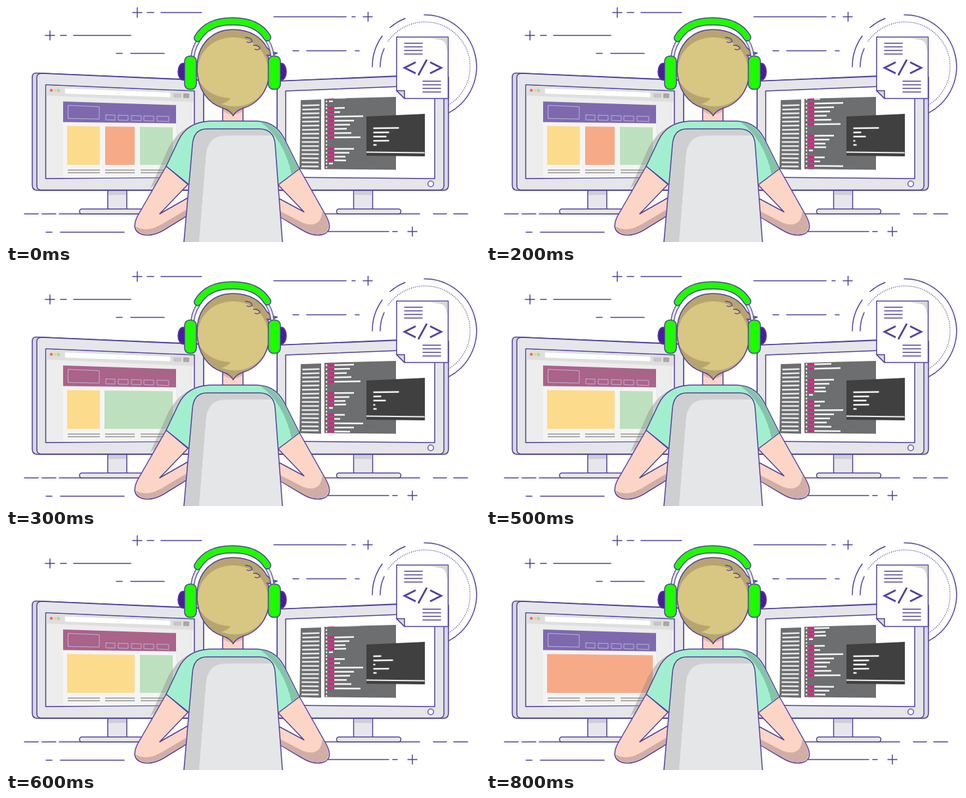
An HTML page that plays this animation: 722 by 361 pixels, repeating every 900 ms.

```html
<!DOCTYPE html>
<html lang="en">
<head>
<meta charset="utf-8">
<title>Developer at work</title>
<style>
html, body { margin: 0; width: 100%; height: 100%; overflow: hidden; background: #fff; }
svg { display: block; width: 100%; height: 100%; }
.line { fill: none; stroke: #51409b; stroke-width: 1.5; stroke-linecap: round; stroke-linejoin: round; }
.edge { stroke: #51409b; stroke-width: 1.5; stroke-linejoin: round; }
.wire { fill: none; stroke: #c3bcdd; stroke-width: .9; }
/* The small head start keeps each change clear of the frame boundary. */
.step { animation: 900ms step-end -40ms infinite; }
.scroll { animation-name: turn; animation-delay: calc(var(--turn) * 100ms - 940ms); }
#banner { fill: #7d6aae; animation-name: tint; }
#pageB { animation-name: showB; }
#pageC { animation-name: showC; }
#pageD { animation-name: showD; }
#termB { animation-name: outputB; }
#termC { animation-name: outputC; }
@keyframes turn { 0% { opacity: 1; } 11.111%, 100% { opacity: 0; } }
@keyframes tint { 33.33% { fill: #aa6389; } 77.77%, 100% { fill: #7d6aae; } }
@keyframes showB { 0% { opacity: 0; } 33.33%, 100% { opacity: 1; } }
@keyframes showC { 0% { opacity: 0; } 55.55%, 100% { opacity: 1; } }
@keyframes showD { 0% { opacity: 0; } 77.77%, 100% { opacity: 1; } }
@keyframes outputB { 0% { opacity: 0; } 22.22% { opacity: 1; } 44.44%, 100% { opacity: 0; } }
@keyframes outputC { 0% { opacity: 0; } 66.66% { opacity: 1; } 88.88%, 100% { opacity: 0; } }
</style>
</head>
<body>
<svg viewBox="0 0 722 361">
  <defs>
    <clipPath id="editor"><path d="M485 142L594 139V250.500L485 249.500Z"/></clipPath>
    <g id="stand">
      <path class="edge" fill="#e6e7ea" d="M155 281H184V311H155Z"/>
      <path fill="#cfcfd2" d="M156 282H183V289H156Z"/>
      <rect class="edge" fill="#e6e7ea" x="112" y="310.500" width="98" height="7.500" rx="3.500"/>
    </g>
  </defs>
  <rect width="722" height="361" fill="#fff"/>

  <!-- Backdrop -->
  <path class="line" d="M193 10H207M200 2.500V17.500M215 10H225M236 10H298
    M60 45H74M67 38V52M83 45H92M103 45H190M168 72.500H177M190 72.500H241
    M437 68.500H446M458 68.500H518M532 68.500H538M408 16.500H518M527 16.500H532M544 16.500H558M551.500 9.500V23.500
    M28 318H49M55 318H76M81 318H630M651 318H671M682 318H703
    M61 346H70M83 346H180M490 345H583M589 345H596M612 345H626M619 338V352"/>
  <path class="line" d="M558 93A79.500 79.500 0 0 1 573 46M585 33A79.500 79.500 0 0 1 608 19M637 13.500A79.500 79.500 0 0 1 673 164M570 93A67.500 67.500 0 0 1 576 65"/>
  <path class="line" d="M582 54A68.500 68.500 0 1 1 673 152" stroke-dasharray=".2 2.800" style="stroke-width:1.300"/>

  <!-- Left monitor -->
  <use href="#stand"/>
  <path class="edge" fill="#d7d8dc" d="M40 109Q40 102 47 102.500L293 113Q301 114 301 121V282H48Q40 282 40 274Z"/>
  <path class="edge" fill="#e5e6ea" d="M47 112Q46 103 54 103L293 113.500Q301 114 301 121V281.500H54Q47 281.500 47 275Z"/>
  <path class="edge" fill="#ededed" d="M60.500 120.500L287 130V262L60.500 264Z"/>
  <path fill="#dfdfdf" d="M61.500 121.500L286 131V147L61.500 137Z"/>
  <path fill="#fff" d="M90 126L250 132.500V139.500L90 134Z"/>
  <path fill="#c6c6c6" d="M255 133.500L267 134V140.500L255 140Z"/>
  <path fill="#a6a6a6" d="M270 133.500L279 134V141L270 140.500Z"/>
  <circle cx="69" cy="129" r="2.300" fill="#f06a65"/>
  <circle cx="74.500" cy="129.200" r="2.300" fill="#f5d568"/>
  <circle cx="80" cy="129.400" r="2.300" fill="#a4d7a0"/>
  <path fill="#f4f4f4" d="M87 146L259 152V262L87 263Z"/>
  <path id="banner" class="step" d="M87 146L259 151.500V179.500L87 177.500Z"/>
  <path class="wire" d="M94.500 152L142 154V173L94.500 172ZM152 166.500L166 167V174.500L152 174ZM171 167L186 167.500V175L171 174.500ZM191 167.500L206 168V175.500L191 175ZM210 168L225 168.500V176L210 175.500ZM230 168.500L248 169V176.500L230 176Z"/>
  <g id="pages"></g>
  <path stroke="#969696" stroke-width="1.600" d="M94 251H143M94 255H143M151 251H196M151 255H196M205 251H254M205 255H254"/>

  <!-- Right monitor -->
  <use href="#stand" transform="translate(713.500) scale(-1 1)"/>
  <path class="edge" fill="#d7d8dc" d="M413 115L666 104Q674 104 674 111V274Q674 282 666 282H413Z"/>
  <path class="edge" fill="#e5e6ea" d="M413 115L659 105Q667 105 667 112V275Q667 281.500 660 281.500H413Z"/>
  <path class="edge" fill="#fff" d="M426 130L653 121V264L426 262Z"/>
  <circle class="edge" cx="647" cy="272" r="4.300" fill="#fff" style="stroke-width:1.300"/>
  <path fill="#6d6e70" d="M449 144L480 143V250.500L447 249.500Z"/>
  <g id="sidebar"></g>
  <path fill="#6d6e70" d="M485 142L594 139V250.500L485 249.500Z"/>
  <g id="code" clip-path="url(#editor)"></g>
  <path fill="#404041" d="M549 169L638 165V230L549 229Z"/>
  <path stroke="#eee" stroke-width="2" d="M549 223.500L637.500 224.500"/>
  <g id="terminal"></g>

  <!-- Document -->
  <path class="edge" fill="#fff" d="M595 47.500H673.500V141.500H607L595 129.500Z"/>
  <path fill="#d5d5d8" d="M641 48.500H672.500V82Q672 57 666 53Q660 51 641 48.500Z"/>
  <path class="edge" fill="#d5d5d8" d="M595 129.500H607V141.500Z"/>
  <path class="line" d="M607 57H634M607 62.500H634M607 68H634M607 73.500H634M635 115H662M635 120.500H662M635 126H662M635 131.500H662"/>
  <path class="line" style="stroke-width:2.700;stroke-linecap:butt;stroke-linejoin:miter" d="M624 86L607 94.500L624 103M641 82L628 106M646 86L663 94.500L646 103"/>

  <!-- Body -->
  <path fill="#888" opacity=".4" d="M302 176Q267 182 248 216L220 278L229 273L244 246L264 206Q276 181 302 176Z"/>
  <path class="edge" fill="#fcd5c7" d="M244 245L200 322Q190 343 206 349Q221 354 240 343L290 312V286L234 318L277 273Z"/>
  <path fill="#d1aea5" d="M197 337Q213 347 235 335L274 312V321L239 342Q221 353 206 348Q198 344 197 337Z"/>
  <path class="edge" fill="#fcd5c7" d="M447 249L488 322Q499 343 484 349Q469 354 450 342L400 312V286L454 315L413 272Z"/>
  <path fill="#d1aea5" d="M487 322Q497 342 483 348Q469 353 450 341L417 322L416 313L453 332Q480 341 482 313Z"/>
  <path class="edge" fill="#fcd5c7" d="M330 155H361V182H330Z"/>
  <path fill="#dfb5a9" d="M331 155H360V161Q346 171 331 161Z"/>
  <path class="edge" fill="#a2efcf" d="M310 176H382Q411 177 424 203L447 249L409 278L400 212H290L286 279L244 245L263 205Q276 178 310 176Z"/>
  <path fill="#85c4aa" d="M387 177Q410 180 423 204L446 249L435 257Q423 203 387 177Z"/>
  <path fill="#cecfd0" d="M271 361L284 212Q286 188 306 188H386Q408 188 410 212L421 361Z"/>
  <path fill="#e5e6e8" d="M294 361L305 225Q308 198 337 198H386Q400 198 407 198L410 212L421 361Z"/>
  <path class="line" d="M271 361L284 212Q286 188 306 188H386Q408 188 410 212L421 361"/>

  <!-- Head -->
  <ellipse class="edge" cx="270" cy="100.500" rx="8" ry="13" fill="#4c1b9f"/>
  <ellipse class="edge" cx="419.500" cy="100.500" rx="7.500" ry="13" fill="#4c1b9f"/>
  <path class="edge" fill="#b6a56f" d="M291 94C291 59 314 36 346 36C372 36 389 48 397 63Q403 71 413 72Q405 76 399 76Q402 89 401 105C399 132 382 150 362 156Q350 160 346 168Q342 160 330 156C308 149 291 128 291 94Z"/>
  <path fill="#d8c683" d="M292 101C292 69 316 48 346 48C376 48 399 70 400 101C399 130 382 147 362 152Q345 156 328 150Q338 147 342 141Q309 139 295 116Z"/>
  <path class="line" style="stroke-width:1.300" d="M365 48Q374 48 375 54Q371 57 367 55M377 60Q386 60 387 65Q383 68 379 66M397 75Q405 76 413 72"/>
  <g fill="none" stroke-linecap="round">
    <path stroke="#51409b" stroke-width="6" d="M293 53Q283 68 284 86M398 53Q407 68 406 86"/>
    <path stroke="#e5e6ea" stroke-width="3.500" d="M293 53Q283 68 284 86M398 53Q407 68 406 86"/>
    <path stroke="#51409b" stroke-width="12.300" d="M292 49Q307 23 345 23.500Q383 23 398 48"/>
    <path stroke="#20fa00" stroke-width="9.300" d="M292 49Q307 23 345 23.500Q383 23 398 48"/>
  </g>
  <rect class="edge" x="272" y="76.500" width="18" height="51" rx="8" fill="#20fa00"/>
  <rect class="edge" x="399.500" y="76.500" width="18.500" height="51" rx="8" fill="#20fa00"/>
</svg>
<script>
const fill = (id, markup) => { document.getElementById(id).innerHTML = markup; };
const range = n => Array.from({ length: n }, (_, i) => i);

// The screen is seen at an angle: rows rise to the right at the top and level out lower down.
const bar = (x, y, width, color, height = 2.5, left = x) => {
  const tilt = (y - 222) * .00033;
  const at = px => `${px} ${y + (px - left) * tilt}`;
  return `<path d="M${at(x)}L${at(x + width)}" stroke="${color}" stroke-width="${height}"/>`;
};

// Web page layouts: [left, right, colour]; each one covers the layout before it.
const yellow = '#fcdc8c', orange = '#f7aa88', green = '#bde1be';
const layouts = {
  A: [[93, 143, yellow], [151, 196, orange], [204, 254, green]],
  B: [[93, 143, yellow], [150, 254, green]],
  C: [[93, 196, yellow], [204, 254, green]],
  D: [[93, 254, orange]]
};
const block = ([left, right, color]) => {
  const top = x => 183.5 + (x - 93) * .013;
  return `<path fill="${color}" d="M${left} ${top(left)}L${right} ${top(right)}V243H${left}Z"/>`;
};
fill('pages', Object.entries(layouts).map(([key, blocks]) =>
  `<g id="page${key}" class="step"><path fill="#f4f4f4" d="M90 181H257V246H90Z"/>${blocks.map(block).join('')}</g>`).join(''));

fill('sidebar', range(16).map(i => bar(451.5 - i * .09, 152.2 + i * 6.2, 26, '#e8e8e8')).join(''));

// One repeating block of code: [offset, right end]; rows ending at 0 are empty.
const period = 95;
const rows = [[0, 516], [6.2, 509], [13, 544], [19.3, 530], [25.4, 524], [31.7, 519], [38, 526], [44.7, 540],
  [50.5, 0], [56, 0], [62, 530], [68, 523], [74, 517], [79.5, 518], [84.5, 498], [90, 0]];
const codeRow = (y, end) => {
  const part = (from, to, color, height) => bar(from, y, to - from, color, height, 487);
  const dot = part(487, 489.2, '#eee');
  if (!end) return dot;
  if (end < 500) return dot + part(492, end, '#f5f5f5');
  return dot + part(491, 500, '#e51c83', 3.4) + part(500, end, '#f5f5f5');
};
const codeView = turn => [-1, 0, 1].map(n => rows.map(([offset, end]) =>
  codeRow(156.5 + offset + n * period - turn * 10, end)).join('')).join('');
fill('code', range(9).map(turn =>
  `<g class="step scroll" style="--turn:${turn}">${codeView(turn)}</g>`).join(''));

const outputs = { A: [39, 24, 20, 24, 5], B: [39, 12, 19, 3, 5], C: [12, 30, 3, 24, 5] };
fill('terminal', Object.entries(outputs).map(([key, widths]) =>
  `<g id="term${key}" class="step"><path fill="#404041" d="M556 181H602V217H556Z"/>${
    widths.map((width, i) => bar(559.5, 187 + i * 6.4, width, '#f2f2f2')).join('')}</g>`).join(''));
</script>
</body>
</html>
```
